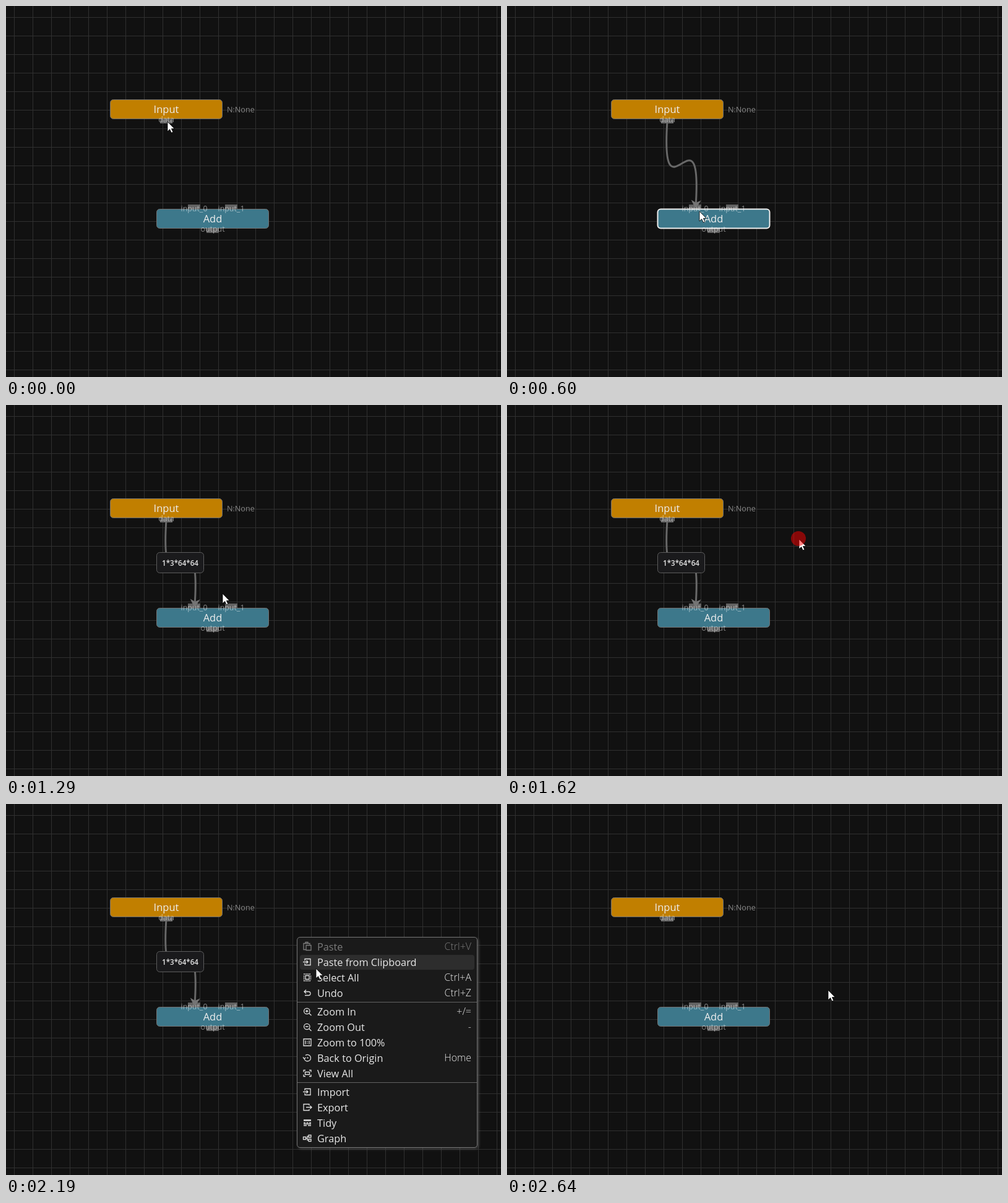
An HTML page for the animation above (3390 ms loop, 800 by 600 pixels).

```html
<!DOCTYPE html>
<html lang="en">
<head>
<meta charset="utf-8">
<title>Node editor</title>
<style>
html, body { margin: 0; width: 100%; height: 100%; overflow: hidden; background: #111; }
svg { display: block; width: 100%; height: 100%; font-family: "Open Sans", "Noto Sans", sans-serif; }
.grid { stroke: #303030; fill: none; }
.port { fill: #626262; }
.portName { font-size: 12.4px; fill: #fff; fill-opacity: .5; text-anchor: middle; }
.note { font-size: 12.6px; fill: #858585; }
.title { font-size: 16.5px; fill: #eee; text-anchor: middle; }
.node { stroke: #717171; }
.node.hover { stroke: #eee; stroke-width: 2; }
#line { fill: none; stroke: #686868; stroke-width: 3; }
#label rect { fill: #1a1a1c; stroke: #5c5c5c; }
#label text { font-size: 11.6px; font-weight: 600; fill: #e8e8e8; text-anchor: middle; }
#menu > .panel { fill: #1a1a1a; stroke: #747474; filter: drop-shadow(2px 2px 2px rgba(125,125,125,.4)); }
#menu .rule { stroke: #626262; }
#rowHover { fill: #2d2d2d; }
.item { fill: #e8e8e8; stroke: #e0e0e0; font-size: 16.3px; }
.item.off { fill: #7c7c7c; stroke: #7c7c7c; }
.item text { stroke: none; }
.item .key { font-weight: 300; font-size: 16px; text-anchor: end; }
.item path { fill: none; stroke-width: 1.3; }
</style>
</head>
<body>
<svg viewBox="0 0 800 600">
  <defs>
    <marker id="tip" markerUnits="userSpaceOnUse" markerWidth="20" markerHeight="20" refX="10" refY="9" orient="auto" overflow="visible">
      <path d="M0 1L14 9 0 17 4 9Z" fill="#757575"/>
    </marker>
  </defs>
  <path class="grid" id="grid"/>
  <g id="ports"></g>
  <g id="edge">
    <rect class="port" id="grip" width="20" height="14"/>
    <path id="line" marker-end="url(#tip)"/>
  </g>
  <g id="nodes"></g>
  <g id="names"></g>
  <g id="label">
    <rect x="243.5" y="238.5" width="76" height="33" rx="5"/>
    <text x="281.5" y="260">1*3*64*64</text>
  </g>
  <g id="menu">
    <rect class="panel" x="470.5" y="215.5" width="291" height="340" rx="4.5"/>
    <rect id="rowHover" x="475" width="282" height="24" rx="4"/>
    <path class="rule" d="M471 320.5H761M471 450.5H761"/>
    <g id="items"></g>
  </g>
  <path id="cursor" d="M0 0V16L3.7 12.5 6.2 18 8.9 16.9 6.4 11.5H11.2Z" fill="#fff" stroke="#000" stroke-width=".8"/>
  <circle id="press" r="12" fill-opacity=".5"/>
</svg>
<script>
const LOOP = 3390, STEP = 30;
const PRESS = 60, DROP = 600, LABEL = 750, RIGHT_PRESS = 1620, MENU = 1710, CLICK = 2520, UNDO = 2640;
const $ = id => document.getElementById(id);
const show = (id, on) => $(id).setAttribute('visibility', on ? 'visible' : 'hidden');
const set = (id, attrs) => {
  for (const name in attrs) $(id).setAttribute(name, attrs[name]);
};

// Static scene
let grid = '';
for (let x = 13.5; x < 800; x += 30) grid += `M${x} 0V600`;
for (let y = 18.5; y < 600; y += 30) grid += `M0 ${y}H800`;
set('grid', { d: grid });

const ports = [['data', 259, 176, 187.5], ['input_0', 304, 321, 332], ['input_1', 364, 321, 332], ['output', 334, 353, 364.5]];
$('ports').innerHTML = ports.map(([, x, y]) =>
  `<rect class="port" x="${x - 10}" y="${y}" width="20" height="14"/>`).join('');
$('names').innerHTML = ports.map(([name, x, , base]) =>
  `<text class="portName" x="${x}" y="${base}">${name}</text>`).join('') +
  '<text class="note" x="357" y="172">N:None</text>';

const nodes = [['Input', 168, 151, '#c17f00'], ['Add', 243, 328, '#3d788b']];
$('nodes').innerHTML = nodes.map(([name, x, y, color]) =>
  `<rect class="node" id="node${name}" x="${x + .5}" y="${y + .5}" width="181" height="31" rx="5" fill="${color}"/>
   <text class="title" x="${x + 91}" y="${y + 22}">${name}</text>`).join('');

// Icons are drawn around (0, 0)
const enter = 'M-4 -2V-5H5V5H-4V2M-7 0H1M-1.5 -2.5L1 0-1.5 2.5';
const lens = 'M4 -.5A4.7 4.7 0 1 1 -5.4 -.5A4.7 4.7 0 1 1 4 -.5M2.8 3L6.5 6.5M-3 -.5H1.6';
const items = [
  [231, 'Paste', 'Ctrl+V', 'M-2 5H-6V-5H4V-3M-3 -5V-7H1V-5M-2 -2H6V6H-2Z'],
  [256, 'Paste from Clipboard', '', enter],
  [281, 'Select All', 'Ctrl+A', 'M-3 -3H3V3H-3ZM-6 -5.5h2m1 0h2m1 0h2m1 0h2M-6 5.5h2m1 0h2m1 0h2m1 0h2M-5.5 -3v2m0 1v2m0 1v1M5.5 -3v2m0 1v2m0 1v1'],
  [306, 'Undo', 'Ctrl+Z', 'M-2 -5L-5 -2 -2 1M-5 -2H2A3 3 0 0 1 2 4H-4'],
  [336, 'Zoom In', '+/=', lens + 'M-.7 -2.8V1.8'],
  [361, 'Zoom Out', '-', lens],
  [386, 'Zoom to 100%', '', 'M-6 -5.5H6V5.5H-6ZM-3 -3V3M3 -3V3M0 -2V-.7M0 .7V2'],
  [411, 'Back to Origin', 'Home', 'M-5 1A5.3 5.3 0 1 0 -3 -4M-7 -1L-5 1.5-2.5 -.5M-.5 0H1.5M.5 -1V1'],
  [436, 'View All', '', 'M-6 -2V-5H-3M3 -5H6V-2M6 2V5H3M-3 5H-6V2M-3.5 -2H3.5V2H-3.5Z'],
  [466, 'Import', '', enter],
  [491, 'Export', '', 'M3 -3V-5H-6V5H3V3M-2 0H7M4.5 -2.5L7 0 4.5 2.5'],
  [516, 'Tidy', '', 'M-6 -4.5H6M-6 -3.3H6M-6 0H-3M-1.5 0H1.5M3 0H6M-6 2H6M-6 4.5H-1M1 4.5H6'],
  [541, 'Graph', '', 'M-6.5 -2H-2.5V2H-6.5ZM2 -5H6V-1.5H2ZM2 1.5H6V5H2ZM-2.5 0H0M2 -3.2H0V3.2H2']
];
$('items').innerHTML = items.map(([y, name, key, icon], i) =>
  `<g class="item${i ? '' : ' off'}"><path transform="translate(487 ${y - .5})" d="${icon}"/>
   <text x="503" y="${y + 6}">${name}</text><text class="key" x="752" y="${y + 5}">${key}</text></g>`).join('');

// Pointer track: time, x, y
const track = [
  [0, 261, 187], [60, 261, 187], [120, 267, 200], [180, 286, 247], [270, 311, 309], [330, 312, 324], [420, 311, 332],
  [1200, 311, 332], [1260, 327, 321], [1350, 396, 272], [1410, 447, 235], [1470, 472, 217],
  [1950, 472, 217], [1980, 476, 222], [2100, 490, 244], [2250, 509, 281], [2400, 519, 301], [LOOP, 519, 301]
];
function pointerAt(t) {
  const i = track.findIndex(key => key[0] > t);
  const [t0, x0, y0] = track[i - 1], [t1, x1, y1] = track[i];
  const k = (t - t0) / (t1 - t0);
  return [Math.round(x0 + (x1 - x0) * k), Math.round(y0 + (y1 - y0) * k)];
}

function drawEdge(x1, y1) {
  const x0 = 259, y0 = 186, dx = (x1 - x0) / 4, dy = (y1 - y0) * 1.25;
  set('line', { d: `M${x0} ${y0}C${x0 - dx} ${y0 + dy} ${x1 + dx} ${y1 - dy} ${x1} ${y1}` });
}

function render(now) {
  const t = Math.floor(now % LOOP / STEP) * STEP;
  const during = (from, to) => t >= from && t < to;
  const [x, y] = pointerAt(t);
  const dragging = during(PRESS, DROP), menuOpen = during(MENU, UNDO);

  set('cursor', { transform: `translate(${x} ${y})` });
  const right = during(RIGHT_PRESS, MENU);
  show('press', dragging || right || during(CLICK, UNDO));
  set('press', { cx: x - 1, cy: y - 1, fill: right ? '#f00' : '#ff0' });

  show('edge', during(PRESS, UNDO));
  show('grip', dragging);
  set('grip', { x: x - 11, y: y - 15 });
  if (dragging) drawEdge(x, y - 12);
  else drawEdge(305, 324);
  show('label', during(LABEL, UNDO));

  for (const [name, left, top] of nodes) {
    const over = x >= left && x < left + 182 && y >= top && y < top + 32;
    $('node' + name).classList.toggle('hover', over);
  }

  show('menu', menuOpen);
  const row = items.findIndex(item => Math.abs(y - item[0]) <= 12);
  $('rowHover').style.display = menuOpen && row > 0 ? '' : 'none';
  if (row > 0) set('rowHover', { y: items[row][0] - 12 });
}

const start = performance.now();
function tick() {
  render(performance.now() - start);
  requestAnimationFrame(tick);
}
tick();
</script>
</body>
</html>
```
